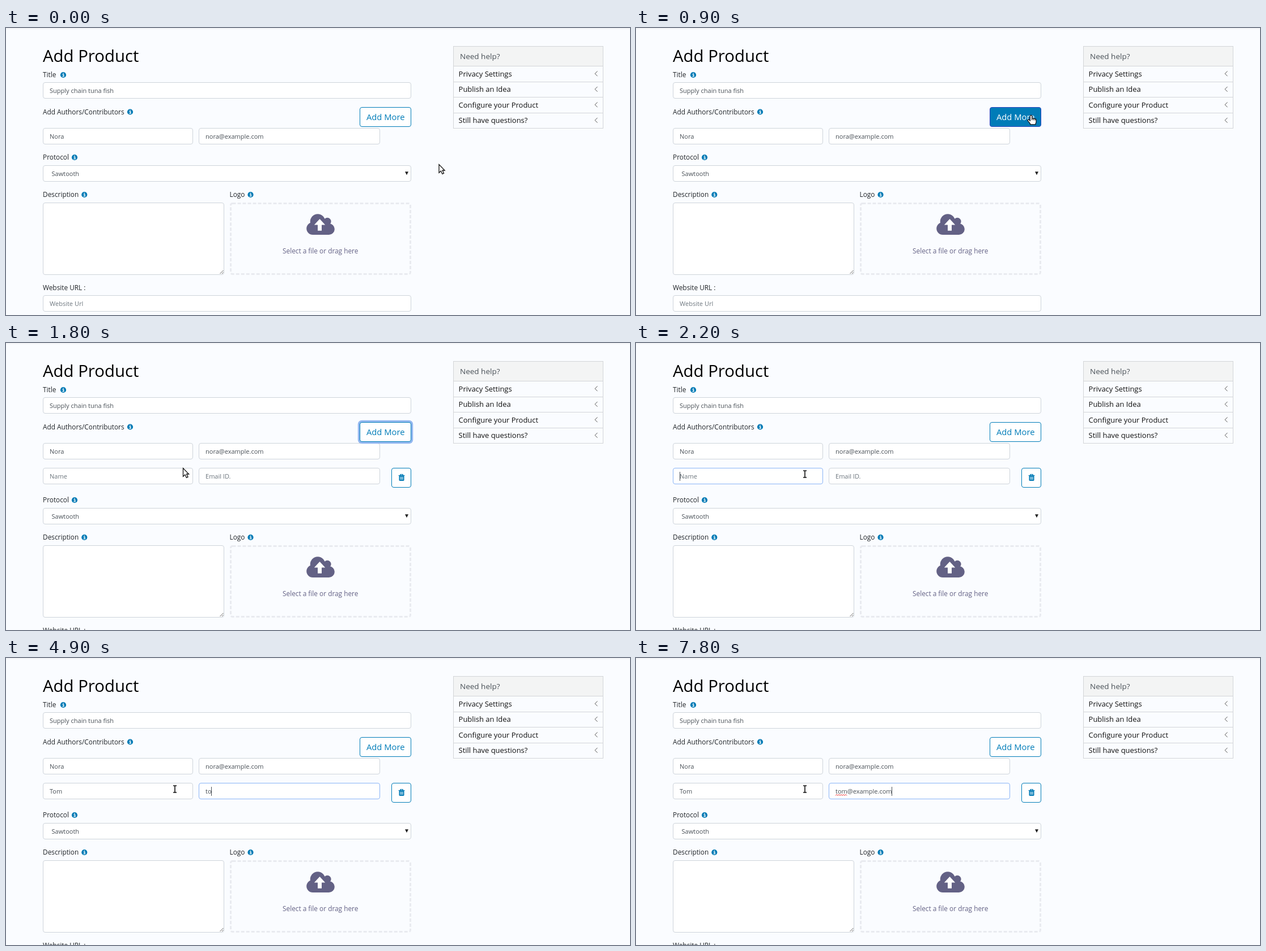
Animation, 1101 px wide and 508 px high, one loop 8000 ms. Source, as an HTML page:

```html
<!DOCTYPE html>
<html lang="en">
<head>
<meta charset="utf-8">
<title>Add Product</title>
<style>
  html, body { margin: 0; width: 100%; height: 100%; overflow: hidden; background: #fafcff; }
  svg { display: block; }
  text { font-family: "Open Sans", "Noto Sans", sans-serif; white-space: pre; }
  .h { font-size: 29.35px; fill: #000; }
  .label { font-size: 11.85px; fill: #212529; }
  .value { font-size: 11.03px; fill: #495057; }
  .hint { font-size: 11.03px; fill: #6c757d; }
  .side { font-size: 12.95px; fill: #111; }
  .box { fill: #fff; stroke: #ced4da; }
  .line { fill: none; stroke: #d3d5d8; }
  .button { fill: #fff; stroke: #007cb8; }
</style>
</head>
<body>
<svg id="stage" width="1101" height="508" viewBox="0 0 1101 508">
  <rect width="1101" height="508" fill="#fafcff"/>
  <rect width="1101" height="1" fill="#f1f2f5"/>
  <rect y="1" width="1101" height="2" fill="#f6f8fb"/>
  <g id="page"></g>
  <g id="row"></g>
  <g id="lower"></g>
  <g id="pointer">
    <path id="arrow" d="M.5 .5V15.2L3.9 12L6.4 17.4L9 16.2L6.6 11H10.6Z" fill="#fff" stroke="#111" stroke-width="1.3"/>
    <g id="hand" stroke="#111" stroke-width="1.2" stroke-linejoin="round">
      <path d="M-1.6 9.5V1Q-1.6 -.6 0 -.6T1.6 1V5Q3.2 4.1 4.2 5.3Q6 4.6 6.9 6Q9 5.6 9 7.8V11.4Q9 13 8 14.2V15.8H-1.5V14.2L-5.5 9.4Q-6.4 7.6-4.7 7.2Q-3.2 7.1-1.6 9.5Z" fill="#fff"/>
      <path d="M1.6 5V8M4.3 5.5V8.3M6.9 6.2V8.6" fill="none"/>
    </g>
    <g id="beam" fill="none">
      <path d="M-3 -6H-1Q0 -6 0 -5Q0 -6 1 -6H3M0 -5V5M-3 6H-1Q0 6 0 5Q0 6 1 6H3" stroke="#fff" stroke-width="3.4"/>
      <path d="M-3 -6H-1Q0 -6 0 -5Q0 -6 1 -6H3M0 -5V5M-3 6H-1Q0 6 0 5Q0 6 1 6H3" stroke="#111" stroke-width="1.6"/>
    </g>
  </g>
</svg>
<script>
const $ = id => document.getElementById(id);
const BLUE = '#007ab5';
const ROW_SHIFT = 49;

const text = (x, y, cls, str, id = '') =>
  `<text x="${x}" y="${y}" class="${cls}" ${id && `id="${id}"`}>${str}</text>`;
const box = (x, y, w, h, id = '', cls = 'box') =>
  `<rect x="${x + .5}" y="${y + .5}" width="${w - 1}" height="${h - 1}" rx="3.5" class="${cls}" ${id && `id="${id}"`}/>`;
const field = (x, y, w, str, cls = 'value', id = '') =>
  box(x, y, w, 29, id && id + 'Box') + text(x + 12, y + 19, cls, str, id);
const info = (x, y) =>
  `<circle cx="${x}" cy="${y}" r="5.1" fill="${BLUE}"/>
   <path d="M${x - 1.5} ${y - .5}H${x + .7}V${y + 2.6}M${x - 1.7} ${y + 2.6}H${x + 1.8}M${x - .8} ${y - 2.6}H${x + .8}"
     fill="none" stroke="#fff" stroke-width="1.3"/>`;

const sideRows = ['Privacy Settings', 'Publish an Idea', 'Configure your Product', 'Still have questions?']
  .map((str, i) => {
    const y = 81 + i * 27.5;
    return text(798.6, Math.floor(y + 5), 'side', str) +
      `<path d="M789 ${Math.floor(y + 14) + .5}H1054" class="line"/>
       <path d="M1043.5 ${y - 4.6}L1039.2 ${y - .2}L1043.5 ${y + 4.2}" fill="none" stroke="#555"/>`;
  }).join('');

$('page').innerHTML =
  text(65, 60, 'h', 'Add Product') +
  text(65, 87, 'label', 'Title') + info(101, 83) +
  field(65, 96, 650, 'Supply chain tuna fish') +
  text(65, 153, 'label', 'Add Authors/Contributors') + info(219, 148.5) +
  field(65, 177, 265, 'Nora') + field(340, 177, 320, 'nora@example.com') +
  `<rect id="ring" x="620.8" y="136.8" width="97.4" height="41.4" rx="7"/>` +
  box(624, 140, 91, 35, 'more', 'button') +
  `<text id="moreText" x="636" y="163" font-size="14.75">Add More</text>
   <rect x="789.5" y="32.5" width="264" height="145" class="line"/>
   <rect x="789.5" y="32.5" width="264" height="35" class="line" style="fill:#f3f4f4"/>
   <text x="801" y="55" font-size="13.5" fill="#495057">Need help?</text>` +
  sideRows;

$('row').innerHTML =
  field(65, 221, 265, '', 'hint', 'name') + field(340, 221, 320, '', 'hint', 'mail') +
  `<path id="squiggle" fill="none" stroke="#e22"/>
   <rect id="caret" y="228" width="1" height="16" fill="#495057"/>` +
  box(680, 221, 35, 35, '', 'button') +
  `<path d="M692.5 234.5H703.5M695.8 234V232.6H700.2V234" fill="none" stroke="${BLUE}" stroke-width="1.2"/>
   <path d="M693.5 235H702.5V242.6Q702.5 244 701.2 244H694.8Q693.5 244 693.5 242.6Z" fill="${BLUE}"/>
   <path d="M696 236.5V242M698 236.5V242M700 236.5V242" stroke="#fff" stroke-width=".9"/>`;

$('lower').innerHTML =
  text(65, 233, 'label', 'Protocol') + info(121, 229) +
  box(65, 243, 650, 29) + text(80.5, 262, 'value', 'Sawtooth') +
  `<path d="M704 254.3H710L707 260.2Z" fill="#222"/>` +
  text(65, 299, 'label', 'Description') + info(138.3, 295) +
  text(394.5, 299, 'label', 'Logo') + info(431.5, 295) +
  box(65, 309, 320, 128) +
  `<path d="M377.5 435L383.5 429M381 435L383.5 432.5" stroke="#666"/>
   <rect x="396.5" y="310.5" width="317" height="125" rx="3" fill="none" stroke="#e9ebf0" stroke-width="3" stroke-dasharray="6 3"/>
   <g fill="#636185">
     <circle cx="541.2" cy="355" r="11"/><circle cx="550" cy="342.6" r="13.3"/>
     <circle cx="567" cy="342.4" r="6.6"/><circle cx="569.8" cy="356" r="10"/>
     <rect x="541" y="344" width="29" height="22"/>
   </g>
   <path d="M553.5 338L563.2 348.4H557V358.8H550V348.4H543.8Z" fill="#fff"/>
   <text x="488" y="399" font-size="11.85" fill="#636185">Select a file or drag here</text>` +
  text(65, 464, 'label', 'Website URL :') +
  field(65, 473, 650, 'Website Url', 'hint');

// time, x, y, pointer shape
const path = [
  [0, 763.5, 241, 'arrow'], [300, 762, 236, 'arrow'], [400, 755, 222, 'arrow'], [500, 742, 204, 'arrow'],
  [600, 726, 184, 'arrow'], [700, 710, 167, 'hand'], [800, 700, 158, 'hand'], [900, 697, 155, 'hand'],
  [1200, 694, 154, 'hand'], [1300, 690, 153.5, 'hand'], [1400, 676, 156, 'hand'], [1500, 618, 166, 'arrow'],
  [1600, 510, 184, 'beam'], [1700, 390, 207, 'arrow'], [1800, 312, 221, 'arrow'],
  [1900, 302, 230, 'beam'], [2000, 298, 232, 'beam']
];
const nameSteps = [[0, ''], [2900, 'Tn'], [3500, 'To'], [3900, 'Tom']];
const address = 'tom@example.com';
const keyTimes = [4700, 4900, 5100, 5600, 6000, 6300, 6500, 6700, 6900, 7000, 7200, 7300, 7500, 7700, 7800];

const at = (steps, t) => steps.filter(s => s[0] <= t).pop();
const ramp = (t, a, b) => Math.min(1, Math.max(0, (t - a) / (b - a)));
const mix = (a, b, k) => `rgb(${a.map((v, i) => Math.round(v + (b[i] - v) * k))})`;
const GREY = [206, 212, 218], FOCUS = [138, 180, 246], TEAL = [0, 124, 184], WHITE = [255, 255, 255];

function setField(id, value, hint) {
  const el = $(id);
  el.textContent = value || hint;
  el.setAttribute('class', value ? 'value' : 'hint');
  return value ? el.getComputedTextLength() : 0;
}

function draw(time) {
  const t = Math.floor(time / 100) * 100;
  const added = t >= 1200;

  const [, x, y, shape] = at(path, t);
  $('pointer').setAttribute('transform', `translate(${x} ${y})`);
  for (const id of ['arrow', 'hand', 'beam']) $(id).style.display = id === shape ? '' : 'none';

  const hover = ramp(t, 600, 800) - ramp(t, 1400, 1600);
  $('more').style.fill = mix(WHITE, TEAL, hover);
  $('more').style.stroke = mix(TEAL, [38, 66, 190], hover);
  $('moreText').style.fill = mix(TEAL, WHITE, hover);
  $('ring').style.fill = mix([148, 184, 240], [151, 163, 242], hover);
  $('ring').style.opacity = ramp(t, 1100, 1300) - ramp(t, 2000, 2200);

  $('row').style.display = added ? '' : 'none';
  $('lower').setAttribute('transform', `translate(0 ${added ? ROW_SHIFT : 0})`);
  if (!added) return;

  const toMail = ramp(t, 4200, 4500);
  $('nameBox').style.stroke = mix(GREY, FOCUS, ramp(t, 2000, 2200) - toMail);
  $('mailBox').style.stroke = mix(GREY, FOCUS, toMail);

  const typed = keyTimes.filter(k => k <= t).length;
  const nameEnd = 77 + setField('name', at(nameSteps, t)[1], 'Name');
  const mailEnd = 352 + setField('mail', address.slice(0, typed), 'Email ID.');
  $('caret').setAttribute('x', Math.floor(t < 4300 ? nameEnd : mailEnd));
  $('caret').style.display = t < 2100 || (t >= 3300 && t < 3500) ? 'none' : '';

  let wave = '';
  if (typed > 3) {
    const end = 352 + $('mail').getSubStringLength(0, 3);
    for (let wx = 352, i = 0; wx <= end; wx += 2, i++) wave += `${i ? 'L' : 'M'}${wx} ${i % 2 ? 241.5 : 243.5}`;
  }
  $('squiggle').setAttribute('d', wave);
}

const start = performance.now();
function tick() {
  draw((performance.now() - start) % 8000);
  requestAnimationFrame(tick);
}
tick();
</script>
</body>
</html>
```
